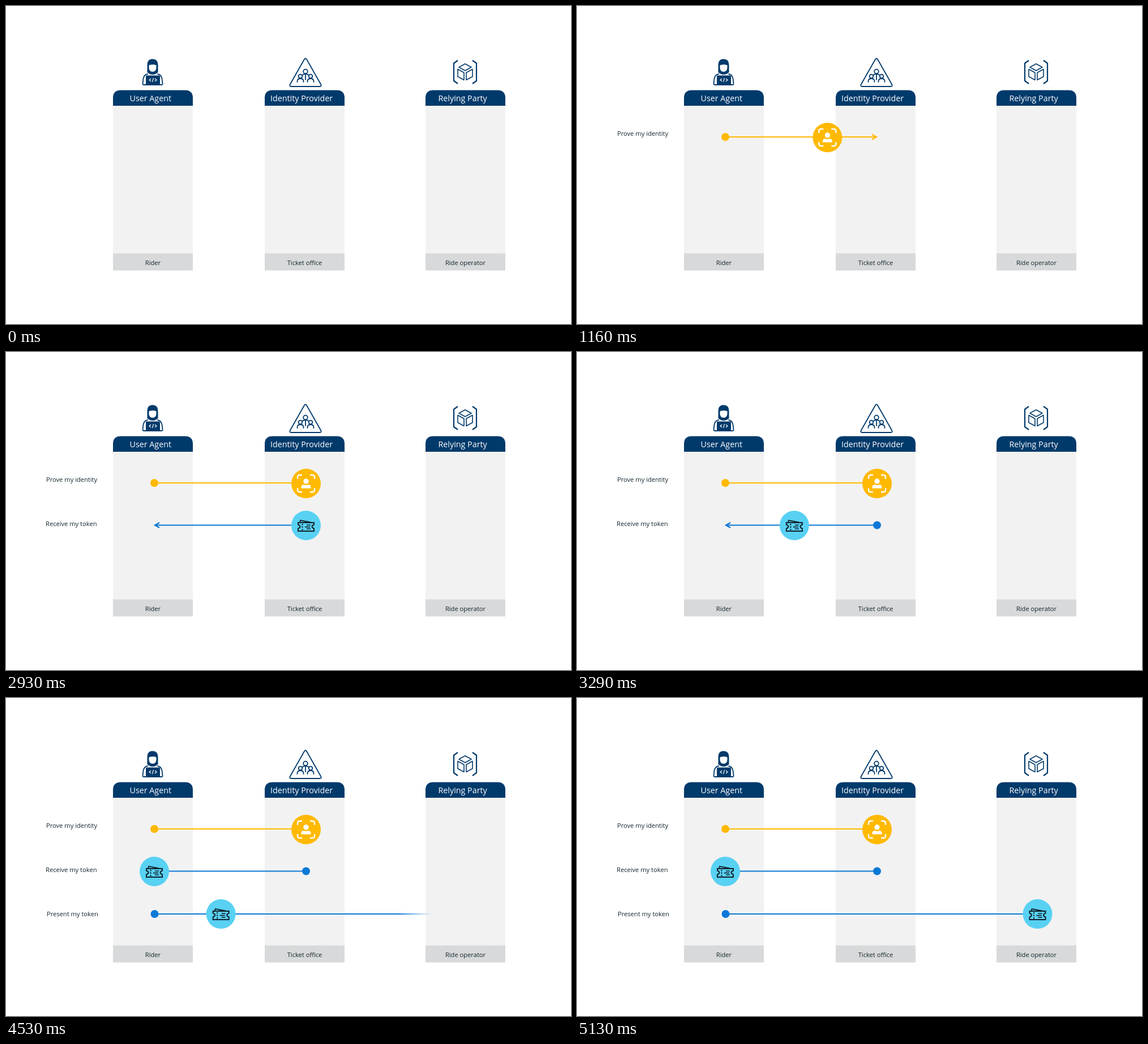
Animation, 998 px wide and 561 px high, one loop 6.72 s. Source, as an HTML page:

```html
<!DOCTYPE html>
<html lang="en">
<head>
<meta charset="utf-8">
<title>Token sign-in flow</title>
<style>
  html, body { margin: 0; width: 100%; height: 100%; overflow: hidden; background: #fff; }
  svg { display: block; width: 100%; height: 100%; }
  text { font-family: "Open Sans", "Noto Sans", sans-serif; font-size: 11.15px; fill: #12262f; }
  .head { font-size: 14.3px; font-weight: 500; fill: #fff; }
  .ink { fill: none; stroke: #003a6b; stroke-width: 1.8; stroke-linecap: round; stroke-linejoin: round; }
</style>
</head>
<body>
<svg viewBox="0 0 998 561">
  <defs>
    <g id="scan">
      <circle r="26" fill="#ffb900"/>
      <path d="M-15-8v-3q0-4 4-4h4M7-15h4q4 0 4 4v3M15 8v3q0 4-4 4H7M-7 15h-4q-4 0-4-4V8"
        fill="none" stroke="#fff" stroke-width="2.4"/>
      <circle cy="-4" r="4.7" fill="#fff"/>
      <path d="M-8.5 8.5V7Q-8.5 2-4 2Q0 4 4 2Q8.5 2 8.5 7V8.5Z" fill="#fff"/>
    </g>
    <g id="ticket">
      <circle r="26" fill="#58d1f3"/>
      <g fill="none" stroke="#10222b" stroke-width="2">
        <path d="M-14-5H14V-1.5Q10.5 0 10.5 2Q10.5 4 14 5.5V10H-14V5.5Q-10.5 4-10.5 2Q-10.5 0-14-1.5Z"/>
        <path d="M-11-5.5L-10-9L8-5.5" stroke-width="1.8"/>
        <path d="M-6.5-3V9" stroke-dasharray="2.5 2"/>
        <path d="M1-.8H8M-2 2.6H7M1 6H8" stroke-width="1.6"/>
      </g>
    </g>
  </defs>
  <g id="columns"></g>

  <g>
    <path d="M249.5 117V104Q249.5 93.5 259 93.5T268.500 104V117Q264 121 259 121T249.500 117Z" fill="#003a6b"/>
    <path d="M252.500 104.500Q259 102 265.500 104.500V109Q265 116 259 116T252.500 109Z" fill="#fff"/>
    <path class="ink" d="M250 120Q244 121 242.500 128L241.500 137Q241.500 139 244 139H274Q277 139 276.500 137L275.500 128Q274 121 268 120"/>
    <rect x="247" y="122.500" width="25" height="16.500" rx="1.500" fill="#003a6b"/>
    <path d="M256 128l-3 2.500 3 2.500M263 128l3 2.500-3 2.500M260.500 127l-2 7" fill="none" stroke="#fff" stroke-width="1.200"/>
  </g>
  <g class="ink">
    <path d="M527 94Q529 91 531 94L556 138Q558 142 554 142H504Q500 142 502 138Z"/>
    <circle cx="529" cy="115.500" r="3.800"/>
    <circle cx="520" cy="124" r="3.300"/>
    <circle cx="538" cy="124" r="3.300"/>
    <path d="M514.500 134V132.500Q515 128 520 128T525.500 132.500V134M532.500 134V132.500Q533 128 538 128T543.500 132.500V134M524 121.500Q529 118 534 121.500M529 121V130"/>
  </g>
  <g class="ink">
    <path d="M798 96L791 101V132L798 137M824 96L831 101V132L824 137" stroke-width="2.200" stroke-linecap="butt"/>
    <path d="M811 102L822 108L811 114L800 108ZM798 111.500L809 117.500V130.500L798 124.500ZM824 111.500L813 117.500V130.500L824 124.500Z" stroke-width="1.600"/>
  </g>

  <g id="steps"></g>
</svg>
<script>
const LOOP = 6720, SOFT = 60;
const NS = "http://www.w3.org/2000/svg";

function add(parent, tag, attrs, text) {
  const el = document.createElementNS(NS, tag);
  set(el, attrs);
  if (text) el.textContent = text;
  return parent.appendChild(el);
}
function set(el, attrs) {
  for (const k in attrs) el.setAttribute(k, attrs[k]);
}
const ramp = (t, start, dur) => Math.min(1, Math.max(0, (t - start) / dur));
const ease = p => p < .5 ? 2 * p * p : 1 - 2 * (1 - p) ** 2;

const columns = document.getElementById("columns");
[
  [189, "User Agent", 218.5, "Rider"],
  [457, "Identity Provider", 467, "Ticket office"],
  [741, "Relying Party", 763.5, "Ride operator"]
].forEach(([x, title, titleX, role]) => {
  add(columns, "rect", { x, y: 176, width: 141, height: 261, fill: "#f2f2f2" });
  add(columns, "rect", { x, y: 436.5, width: 141, height: 30, fill: "#d8d9da" });
  add(columns, "path", { d: `M${x} 176V162Q${x} 148.5 ${x + 14} 148.5H${x + 127}Q${x + 141} 148.5 ${x + 141} 162V176Z`, fill: "#003a6b" });
  add(columns, "text", { x: titleX, y: 168.3, class: "head" }, title);
  add(columns, "text", { x: x + 70.5, y: 456.5, "text-anchor": "middle" }, role);
});

// Times in ms; "drop" is how far above its row the badge enters.
const steps = [
  { text: "Prove my identity", tx: 71, ty: 229, label: 80, color: "#ffb900", icon: "scan",
    from: 262, to: 530, y: 231, by: 232, drop: 0, enter: 380, dot: 380, wipe: 750, wipeDur: 280, move: 750 },
  { text: "Receive my token", tx: 70, ty: 307, label: 1450, color: "#0a78d6", icon: "ticket",
    from: 530, to: 262, y: 305.5, by: 306, drop: 73, enter: 1870, dot: 2730, wipe: 2730, wipeDur: 200, move: 2930 },
  { text: "Present my token", tx: 72, ty: 384.5, label: 3490, color: "#0a78d6", icon: "ticket",
    from: 262.5, to: 813.5, y: 381, by: 381, drop: 55, enter: 3870, dot: 3870, wipe: 4306, wipeDur: 280, move: 4306 }
];

const root = document.getElementById("steps");
steps.forEach((s, i) => {
  s.dir = Math.sign(s.to - s.from);
  s.grad = add(root, "linearGradient", { id: "wipe" + i, gradientUnits: "userSpaceOnUse", y1: 0, y2: 0 });
  add(s.grad, "stop", { offset: 0, "stop-color": s.color });
  add(s.grad, "stop", { offset: 1, "stop-color": s.color, "stop-opacity": 0 });
  const tip = s.to - s.dir;
  const back = tip - s.dir * 8;
  s.line = add(root, "path", {
    d: `M${s.from} ${s.y}H${tip}M${back} ${s.y - 4.5}L${tip} ${s.y}L${back} ${s.y + 4.5}`,
    fill: "none", stroke: `url(#wipe${i})`, "stroke-width": 2.1
  });
  s.dotEl = add(root, "circle", { cx: s.from, cy: s.y, r: 7, fill: s.color });
  s.textEl = add(root, "text", { x: s.tx, y: s.ty }, s.text);
});
steps.forEach(s => { s.badge = add(root, "use", { href: "#" + s.icon }); });

function draw(t) {
  for (const s of steps) {
    const wiped = ramp(t, s.wipe, s.wipeDur);
    const front = s.from + s.dir * wiped * (Math.abs(s.to - s.from) + SOFT);
    set(s.grad, { x1: front - s.dir * SOFT, x2: front });
    set(s.line, { opacity: wiped > 0 ? 1 : 0 });
    set(s.dotEl, { opacity: ramp(t, s.dot, 350) });
    set(s.textEl, { opacity: ramp(t, s.label, 350) });
    const x = s.from + (s.to - s.from) * ease(ramp(t, s.move, 690));
    const y = s.by - s.drop * (1 - ramp(t, s.enter, 430));
    set(s.badge, { opacity: ramp(t, s.enter, 350), transform: `translate(${x} ${y})` });
  }
}

const begin = performance.now();
function tick() {
  draw((performance.now() - begin) % LOOP);
  requestAnimationFrame(tick);
}
tick();
</script>
</body>
</html>
```
